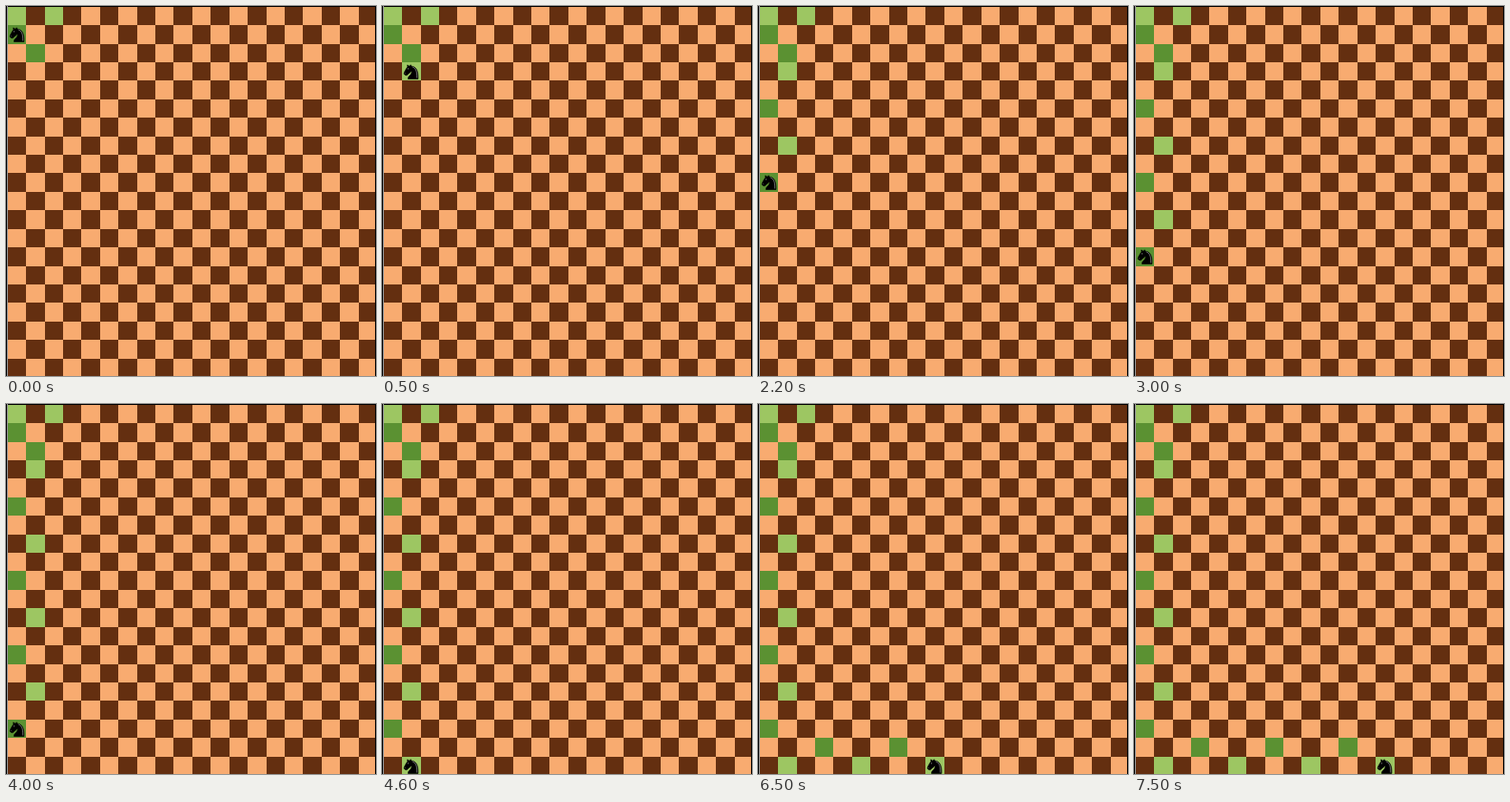
An HTML page with a canvas for the animation above (8 s loop, 389 by 388 pixels).

```html
<!DOCTYPE html>
<html lang="en">
<head>
<meta charset="utf-8">
<title>Knight's tour</title>
<style>
  html, body { margin: 0; height: 100%; overflow: hidden; background: #000; }
  canvas { display: block; }
</style>
</head>
<body>
<canvas id="board" width="389" height="388"></canvas>
<script>
const ctx = document.getElementById('board').getContext('2d');
const LOOP = 8000, COUNT = 20, CELL = 19.42, LEFT = 1.7, TOP = 0.7;
const PLAIN = ['#f8ab70', '#642f10'], VISITED = ['#9dc662', '#5b9132'];

// Squares as [column, row]; the first three are visited before the loop starts.
const tour = [[0, 0], [1, 2], [2, 0], [0, 1]];
for (let row = 3; row < COUNT; row += 2) tour.push([tour.length % 2 ? 0 : 1, row]);
for (let col = 3; col <= 13; col += 2) tour.push([col, col % 4 === 3 ? 18 : 19]);

const body = new Path2D('M22 10C32.5 11 38.5 18 38 39H15C15 30 25 32.5 23 18Z');
const head = new Path2D('M24 18C24.4 21 18.5 25.4 16 27C13 29 13.2 31.3 11 31' +
  'C10 30 12.4 28 11 28C10 28 11.2 29.2 10 30C9 30 6 31 6 26C6 24 12 14 12 14' +
  'C12 14 13.9 12 14 10.5C13.3 9.5 13.5 8.5 13.5 7.5C14.5 6.5 16.5 10 16.5 10' +
  'H18.5C18.5 10 19.3 8 21 7C22 7 22 10 22 10Z');
const mane = new Path2D('M24.5 11.5C32 14 35.5 20 35.3 37');

const edgeX = col => Math.round(LEFT + col * CELL);
const edgeY = row => Math.round(TOP + row * CELL);

function square(col, row, colors) {
  const x = edgeX(col), y = edgeY(row);
  ctx.fillStyle = colors[(col + row) % 2];
  ctx.fillRect(x, y, edgeX(col + 1) - x, edgeY(row + 1) - y);
}

function knight(col, row) {
  ctx.save();
  ctx.translate(edgeX(col) - 0.5, edgeY(row) - 0.5);
  ctx.scale(0.46, 0.46);
  ctx.fillStyle = ctx.strokeStyle = '#000';
  ctx.lineWidth = 1.5;
  ctx.lineJoin = 'round';
  for (const part of [body, head]) {
    ctx.fill(part);
    ctx.stroke(part);
  }
  ctx.strokeStyle = ctx.fillStyle = '#ececec';
  ctx.lineWidth = 1;
  ctx.stroke(mane);
  ctx.fillRect(14, 15, 1.5, 2);
  ctx.fillRect(8.5, 25, 1, 1);
  ctx.restore();
}

function draw(now) {
  const t = now % LOOP;
  // Early moves land 100 ms ahead of the half-second beat.
  const last = 3 + Math.floor((t < 3000 ? t + 100 : t) / 500);

  ctx.fillStyle = '#000';
  ctx.fillRect(0, 0, 389, 388);
  ctx.fillStyle = '#999';
  ctx.fillRect(1, 0, 1, 388);
  for (let row = 0; row < COUNT; row++)
    for (let col = 0; col < COUNT; col++) square(col, row, PLAIN);
  for (const [col, row] of tour.slice(0, last + 1)) square(col, row, VISITED);
  knight(...tour[last]);
  ctx.fillStyle = '#000';
  ctx.fillRect(388, 0, 1, 388);

  requestAnimationFrame(draw);
}
requestAnimationFrame(draw);
</script>
</body>
</html>
```
